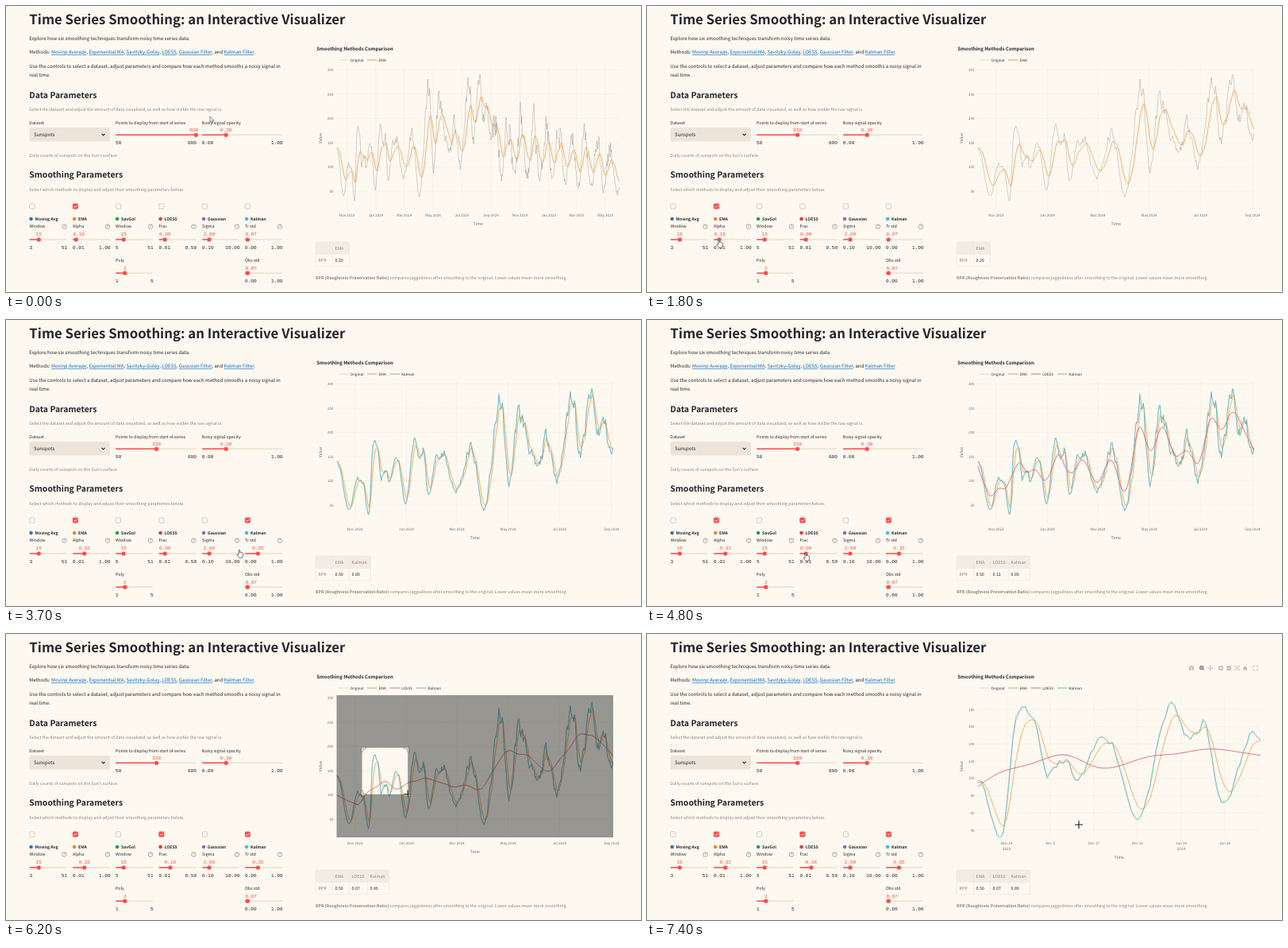
An HTML page that plays this animation: 800x360 px, repeating every 7500 ms.

```html
<!DOCTYPE html>
<html lang="en">
<head>
<meta charset="utf-8">
<title>Time Series Smoothing</title>
<style>
html, body { margin: 0; width: 100%; height: 100%; overflow: hidden; background: #fdf9f0; }
svg { display: block; width: 800px; height: 360px; }
text {
  font-family: "Noto Sans CJK JP", "Noto Sans CJK SC", "Noto Sans CJK KR", "Noto Sans CJK TC", "Noto Sans", sans-serif;
  text-rendering: geometricPrecision; fill: #26252a;
}
.b { font-weight: 700; }
.g { fill: #87847f; }
.k { fill: #716e69; }
.mono { font-family: "Liberation Mono", "DejaVu Sans Mono", monospace; }
.red { fill: #ff4b4b; }
.link { fill: #0068c9; text-decoration: underline; }
.grid { stroke: #e8e3da; stroke-width: .6; stroke-dasharray: 1.3 1.1; fill: none; }
.curve { fill: none; stroke-width: .75; stroke-linejoin: round; }
</style>
</head>
<body>
<svg viewBox="0 0 800 360">
  <clipPath id="plot"><rect id="clip" x="416.5" y="77" height="179"/></clipPath>
  <g id="page"></g><g id="controls"></g><g id="chart"></g><g id="cursor"></g>
</svg>
<script>
const LOOP = 7500, STEP = 100;
const SMALL = 5.32, BODY = 6.1, TICK = 4.56, MONO = 6.1;
const $ = id => document.getElementById(id);
const clamp = (v, lo, hi) => Math.max(lo, Math.min(hi, v));
const mix = (a, b, k) => a + (b - a) * k;
const smooth = k => k * k * (3 - 2 * k);
const ease = (t, t0, t1) => smooth(clamp((t - t0) / (t1 - t0), 0, 1));

const text = (x, y, s, size, cls = '', anchor = 'start') =>
  `<text x="${x}" y="${y}" font-size="${size}" class="${cls}" text-anchor="${anchor}">${s}</text>`;
const rect = (x, y, w, h, fill, more = '') =>
  `<rect x="${x}" y="${y}" width="${w}" height="${h}" fill="${fill}" ${more}/>`;
const path = (d, stroke, w = .7, fill = 'none') =>
  `<path d="${d}" stroke="${stroke}" stroke-width="${w}" fill="${fill}" stroke-linejoin="round"/>`;
const dot = (x, y, r, fill) => `<circle cx="${x}" cy="${y}" r="${r}" fill="${fill}"/>`;

// ---- signal: eased turning points (day, value), then a 27-day rotation, plus seeded noise ----
const turns = [[0, 145], [15, 40], [25, 107], [31, 98], [38, 29], [44, 184], [49, 158], [53, 104], [59, 122], [62, 95],
  [72, 152], [82, 54], [93, 184], [99, 142], [103, 165], [109, 70], [120, 156], [126, 152], [142, 80], [160, 168],
  [175, 40], [195, 264], [205, 92], [216, 238], [239, 125], [250, 192], [262, 105], [281, 288], [289, 150],
  [303, 280], [310, 200], [318, 220], [327, 155]];
for (let d = 336; d < 600; d += 27) {
  const fall = (d - 336) / 264;
  turns.push([d, mix(200, 130, fall * fall)], [d + 13.5, mix(84, 45, fall)]);
}
let seed = 11, drift = 0, leg = 0;
const rnd = () => (seed = seed * 16807 % 2147483647) / 2147483647;
const signal = Array.from({ length: 600 }, (_, d) => {
  while (leg < turns.length - 2 && turns[leg + 1][0] <= d) leg++;
  const [a, b] = [turns[leg], turns[leg + 1]];
  const base = mix(a[1], b[1], ease(d, a[0], b[0]));
  drift = .45 * drift + (rnd() - .5) * (d < 125 ? .09 : d < 330 ? .17 : .32) * base;
  return clamp(base + drift, 26, 291);
});

// ---- smoothing ----
function ema(v, a) {
  let s = v[0];
  return v.map(x => s += a * (x - s));
}
function kalman(v, q, r) {
  const p = (q + Math.sqrt(q * q + 4 * q * r)) / 2;
  return ema(v, p / (p + r));
}
function loess(v, frac) {
  const n = v.length, w = Math.round(frac * n);
  return v.map((_, i) => {
    const from = clamp(i - (w >> 1), 0, n - w);
    const reach = Math.max(i - from, from + w - 1 - i) + .01;
    let s = 0, sx = 0, sy = 0, sxx = 0, sxy = 0;
    for (let j = from; j < from + w; j++) {
      const x = j - i, k = (1 - Math.abs(x / reach) ** 3) ** 3;
      s += k; sx += k * x; sy += k * v[j]; sxx += k * x * x; sxy += k * x * v[j];
    }
    return (sxx * sy - sx * sxy) / (s * sxx - sx * sx);
  });
}

// ---- timeline: each move runs from start to end and arrives at x, y ----
const KALMAN_ON = 2900, LOESS_ON = 4400, DRAG_AT = 6000, ZOOM_AT = 6700;
const MOVES = [[0, 200, 239, 163, 'hand'], [300, 600, 189.5, 163, 'hand'], [600, 900, 149, 234, 'beam'],
  [1000, 1300, 88, 294, 'hand'], [1600, 2200, 98.6, 294, 'hand'], [2200, 2600, 292, 256, 'arrow'],
  [2600, 2800, 304, 252, 'hand'], [2900, 3200, 304, 291, 'hand'], [3200, 3500, 317.5, 291, 'hand'],
  [3500, 3700, 294, 289, 'hand'], [3700, 4200, 196, 252, 'hand'], [4500, 4800, 200, 293, 'hand'],
  [5000, 5400, 207, 294, 'hand'], [5600, 5900, 448, 143, 'cross'], [DRAG_AT, 6350, 544, 240, 'cross']];

function pointer(t) {
  let p = { x: 257, y: 139, shape: 'arrow' };
  for (const [t0, t1, x, y, shape] of MOVES) {
    if (t <= t0) break;
    const k = ease(t, t0, t1);
    p = { x: mix(p.x, x, k), y: mix(p.y, y, k), shape };
  }
  return p;
}

// ---- left column ----
const COLS = [29.5, 84, 138, 192.5, 247, 301];
const NAMES = ['Moving Avg', 'EMA', 'SavGol', 'LOESS', 'Gaussian', 'Kalman'];
const DOTS = ['#2f74b5', '#f0862a', '#2c9f44', '#d93a40', '#946aa6', '#45bbdd'];
const PARAMS = ['Window', 'Alpha', 'Window', 'Frac', 'Sigma', 'Tr std'];

function drawPage() {
  const links = ['Moving Average', 'Exponential MA', 'Savitzky-Golay', 'LOESS', 'Gaussian Filter', 'Kalman Filter']
    .map((s, i) => `${i === 5 ? 'and ' : ''}<tspan class="link">${s}</tspan>`).join(', ');
  let s = text(29.3, 23, 'Time Series Smoothing: an Interactive Visualizer', 16.8, 'b')
    + text(29.3, 42.7, 'Explore how six smoothing techniques transform noisy time series data.', BODY)
    + text(29.3, 60.3, `Methods: ${links}.`, BODY)
    + text(29.3, 77.9, 'Use the controls to select a dataset, adjust parameters and compare how each method smooths a noisy signal in', BODY)
    + text(29.3, 89, 'real time.', BODY)
    + text(29.3, 115.6, 'Data Parameters', 10.45, 'b')
    + text(29.3, 132, 'Select the dataset and adjust the amount of data visualized, as well as how visible the raw signal is.', SMALL, 'g')
    + text(29.3, 148.7, 'Dataset', SMALL)
    + text(138, 148.7, 'Points to display from start of series', SMALL)
    + text(246.6, 148.7, 'Noisy signal opacity', SMALL)
    + rect(29.3, 153, 101.7, 17.6, '#ece3d9', 'rx="3.2"')
    + text(35, 164.3, 'Sunspots', BODY)
    + path('M120.6 160.9l2 2 2-2', '#26252a', 1.1)
    + text(29.3, 190, "Daily counts of sunspots on the Sun's surface.", SMALL, 'g')
    + text(29.3, 216.4, 'Smoothing Parameters', 10.45, 'b')
    + text(29.3, 232.6, 'Select which methods to display and adjust their smoothing parameters below.', SMALL, 'g')
    + text(138, 322, 'Poly', SMALL) + text(301, 322, 'Obs std', SMALL);
  COLS.forEach((x, i) => {
    s += dot(x + 2.1, 268, 2.3, DOTS[i]) + text(x + 7, 270, NAMES[i], 5.2, 'b')
      + text(x, 279.4, PARAMS[i], SMALL)
      + `<circle cx="${x + 44}" cy="277.6" r="2.8" fill="none" stroke="#77746f" stroke-width=".6"/>`
      + text(x + 44, 279.3, '?', 4.4, 'k', 'middle');
  });
  s += text(391.3, 56, 'Smoothing Methods Comparison', 6, 'b')
    + text(390, 344.4, '<tspan class="b" font-size="5.2">RPR (Roughness Preservation Ratio)</tspan> compares jaggedness after smoothing to the original. Lower values mean more smoothing.', SMALL, 'g');
  $('page').innerHTML = s;
}

function slider(x, y, w, lo, hi, v, digits) {
  const h = x + w * (v - lo) / (hi - lo), f = n => n.toFixed(digits);
  const half = f(v).length * 1.83;
  return rect(x, y - .8, w, 1.6, '#ebe0cb', 'rx=".8"') + rect(x, y - .8, h - x, 1.6, '#ff4b4b', 'rx=".8"')
    + dot(h, y, 2.6, '#ff4b4b')
    + text(clamp(h, x + half + .4, x + w + 3 - half), y - 4.7, f(v), MONO, 'mono red', 'middle')
    + text(x, y + 11.8, f(lo), MONO, 'mono') + text(x + w + .6, y + 11.8, f(hi), MONO, 'mono', 'end');
}

function checkbox(x, on) {
  return rect(x + .2, 248.9, 6.4, 6.4, on ? '#ff4b4b' : '#fdf9f0', `rx="1.4" stroke="${on ? '#ff4b4b' : '#bdb8b0'}" stroke-width=".7"`)
    + (on ? path(`M${x + 1.7} 252.2l1.3 1.4 2.4-2.9`, '#fff', .9) : '');
}

function drawControls(st) {
  let s = slider(138, 162.3, 101.3, 50, 600, st.points, 0) + slider(246.8, 162.3, 101.3, 0, 1, .3, 2);
  [[3, 51, 15, 0], [.01, 1, st.alpha, 2], [5, 51, 15, 0], [.01, .5, st.frac, 2], [.1, 10, 2, 2], [0, 1, st.tr, 2]]
    .forEach((p, i) => { s += slider(COLS[i], 294, 47, ...p); });
  s += slider(138, 336.2, 47, 1, 5, 2, 0) + slider(301, 336.2, 47, 0, 1, .07, 2);
  COLS.forEach((x, i) => { s += checkbox(x, i === 1 || i === 3 && st.loess || i === 5 && st.kalman); });
  $('controls').innerHTML = s;
}

// ---- chart ----
const START = Date.UTC(2023, 9, 10), DAY = 864e5, TOP = 77, LEFT = 416.5;

// Every second month, or every second week with the year where it changes
function dateTicks(zoomed, last) {
  const out = [];
  let year = 0;
  for (let i = 0; ; i++) {
    const date = new Date(zoomed ? Date.UTC(2023, 10, 19 + 14 * i) : Date.UTC(2023, 10 + 2 * i, 1));
    const d = (date - START) / DAY, y = date.getUTCFullYear();
    if (d > last) return out;
    const month = date.toLocaleString('en-US', { month: 'short', timeZone: 'UTC' });
    out.push(zoomed ? [d, `${month} ${date.getUTCDate()}`, y === year ? '' : y] : [d, `${month} ${y}`, '']);
    year = y;
  }
}

function modebar() {
  const c = '#bcb8b1', y = 43;
  const square = (x, d) => rect(x - 2.8, y - 2.8, 5.6, 5.6, c, 'rx=".6"') + path(d, '#fdf9f0', .9);
  return rect(682.9, 41, 6.2, 4.6, c, 'rx=".7"') + rect(684.7, 40, 2.6, 1.4, c) + dot(686, 43.3, 1.3, '#fdf9f0')
    + `<circle cx="698.7" cy="42.4" r="2.1" fill="none" stroke="#7d7a75" stroke-width="1.2"/>`
    + path('M700.3 44l2 2M697.7 42.4h2M698.7 41.4v2', '#7d7a75', .9)
    + path('M706.6 43h6.4M709.8 39.8v6.4M707.6 42l-1 1 1 1M712 42l1 1-1 1M708.8 40.8l1-1 1 1M708.8 45.2l1 1 1-1', c, .8)
    + square(723, 'M721 43h4M723 41v4') + square(733.2, 'M731.2 43h4')
    + path('M741.2 40.7l4.6 4.6M745.8 40.7l-4.6 4.6M740.8 42v-1.7h1.7M744.5 40.3h1.7V42M746.2 44v1.7h-1.7M742.5 45.7h-1.7V44', c, .8)
    + path('M750.8 43.2l2.8-2.8 2.8 2.8h-.8v2.4h-1.4v-1.6h-1.2v1.6h-1.4v-2.4z', c, .3, c)
    + path('M763.8 42v-1.8h1.8M767.6 40.2h1.8V42M769.4 44v1.8h-1.8M765.6 45.8h-1.8V44', c, .8);
}

function drawTable(cols) {
  const width = 21.5 + cols.reduce((a, c) => a + c[2], 0), line = '#ece5db';
  let s = rect(390, 297, width, 15.5, '#f2ece4', 'rx="2"')
    + text(393.4, 322.2, 'RPR', SMALL, 'g'), x = 411.5;
  let lines = `M390 312.5h${width}M411.5 297v30.8`;
  cols.forEach(([name, v, w], i) => {
    if (i) lines += `M${x} 297v30.8`;
    s += text(x + 3, 306.8, name, SMALL, 'g') + text(x + 3, 322.2, v.toFixed(2), SMALL);
    x += w;
  });
  return s + path(lines, line, .5) + rect(390, 297, width, 30.8, 'none', `rx="2" stroke="${line}" stroke-width=".6"`);
}

function selection(x, y, right) {
  const x0 = 448.6, y0 = 143.3, x1 = Math.max(x0 + 1, x), y1 = Math.max(y0 + 1, y);
  const corner = (cx, cy, dx, dy) =>
    path(`M${cx + 5 * dx} ${cy}H${cx}V${cy + 5 * dy}`, '#444', 2.2) + path(`M${cx + 4.6 * dx} ${cy}H${cx}V${cy + 4.6 * dy}`, '#fff', 1.3);
  return `<path d="M${LEFT} ${TOP}H${right}V256H${LEFT}zM${x0} ${y0}V${y1}H${x1}V${y0}z" fill="#000" fill-opacity=".4" fill-rule="evenodd"/>`
    + corner(x0, y0, 1, 1) + corner(x1, y0, -1, 1) + corner(x0, y1, 1, -1) + corner(x1, y1, -1, -1);
}

function drawChart(st) {
  const { zoomed } = st, n = Math.round(st.points), raw = signal.slice(0, n);
  const right = zoomed || n > 500 ? 773 : 765, middle = (LEFT + right) / 2;
  const [d0, d1] = zoomed ? [30.7, 121.5] : [0, n - 1];
  const [lo, hi] = zoomed ? [31.7, 196.6] : [12.3, 305.7];
  const px = d => LEFT + (d - d0) / (d1 - d0) * (right - LEFT);
  const py = v => TOP + (hi - v) / (hi - lo) * 179;
  const curve = (v, color, more = '') => `<path class="curve" stroke="${color}" ${more} d="M`
    + v.map((y, d) => `${px(d).toFixed(2)} ${py(y).toFixed(2)}`).join('L') + '"/>';
  $('clip').setAttribute('width', right - LEFT);

  let grid = '', s = '';
  const step = zoomed ? 20 : 50;
  for (let v = zoomed ? 40 : 50; v < hi; v += step) {
    grid += `M${LEFT} ${py(v)}H${right}`;
    s += text(412.6, py(v) + 1.6, v, TICK, 'k', 'end');
  }
  dateTicks(zoomed, d1).forEach(([d, a, b]) => {
    grid += `M${px(d)} ${TOP}V256`;
    s += text(px(d), 265.2, a, TICK, 'k', 'middle') + text(px(d), 271.6, b, TICK, 'k', 'middle');
  });
  s += text(middle, zoomed ? 283 : 276, 'Time', SMALL, 'k', 'middle')
    + `<g transform="translate(398 166.5) rotate(-90)">${text(0, 0, 'Value', SMALL, 'k', 'middle')}</g>`;

  const items = [['Original', '#c9c6c0', 36], ['EMA', '#ef9340', 28.6]];
  const cols = [['EMA', mix(.2, .21, n < 400) + (st.alpha - .1) * 1.32, 21]];
  let lines = curve(raw, '#3c3b3a', 'stroke-opacity=".3"') + curve(ema(raw, st.alpha), '#ef9340');
  if (st.loess) {
    items.push(['LOESS', '#d54752', 33.4]);
    cols.push(['LOESS', .12 - (st.frac - .09) * .7, 23]);
    lines += curve(loess(raw, st.frac), '#d54752');
  }
  if (st.kalman) {
    items.push(['Kalman', '#4fb9c0', 0]);
    cols.push(['Kalman', .69 + (st.tr - .07) * .71, 27]);
    lines += curve(kalman(raw, st.tr, .07), '#4fb9c0');
  }
  let x = 419;
  items.forEach(([name, color, w], i) => {
    const d = `M${x} 68h12.5`;
    s += path(d, color, .6) + (i ? path(d, '#4446', .5) : '') + text(x + 14.6, 69.7, name, TICK);
    x += w;
  });
  s = `<path class="grid" d="${grid}"/><g clip-path="url(#plot)">${lines}</g>` + s + drawTable(cols);
  if (st.t >= DRAG_AT && !zoomed) s += selection(st.x, st.y, right);
  if (zoomed) s += modebar();
  $('chart').innerHTML = s;
}

// ---- pointer ----
const CURSORS = {
  arrow: path('M0 0v7.2l1.7-1.5 1.2 2.6 1.2-.6-1.2-2.5h2.3z', '#333', .6, '#fff'),
  hand: path('M-.8 5.5V.8q.8-1 1.6 0v3q1.5-.6 3.6.6.7 1.2-.2 4l-.6 1.8h-3.8l-2.9-3.6q.5-1.4 2.3-.2z', '#333', .7, '#fff'),
  beam: path('M-1.6-4q1.6 0 1.6 1v6q0 1-1.6 1M1.6-4q-1.6 0-1.6 1v6q0 1 1.6 1', '#333', .7),
  cross: path('M-5 0H5M0-5V5', '#fff', 2) + path('M-5 0H5M0-5V5', '#111', 1.1)
};

function draw(t) {
  const st = {
    t, ...pointer(t),
    points: mix(600, 330, ease(t, 300, 600)),
    alpha: mix(.1, .32, ease(t, 1600, 2200)),
    tr: mix(.07, .35, ease(t, 3200, 3500)),
    frac: mix(.09, .16, ease(t, 5000, 5400)),
    loess: t >= LOESS_ON, kalman: t >= KALMAN_ON, zoomed: t >= ZOOM_AT
  };
  drawControls(st);
  drawChart(st);
  $('cursor').innerHTML = `<g transform="translate(${st.x} ${st.y})">${CURSORS[st.shape]}</g>`;
}

drawPage();
let shown = -1;
const begin = performance.now();
function tick() {
  const t = Math.floor((performance.now() - begin) % LOOP / STEP) * STEP;
  if (t !== shown) draw(shown = t);
  requestAnimationFrame(tick);
}
tick();
</script>
</body>
</html>
```
